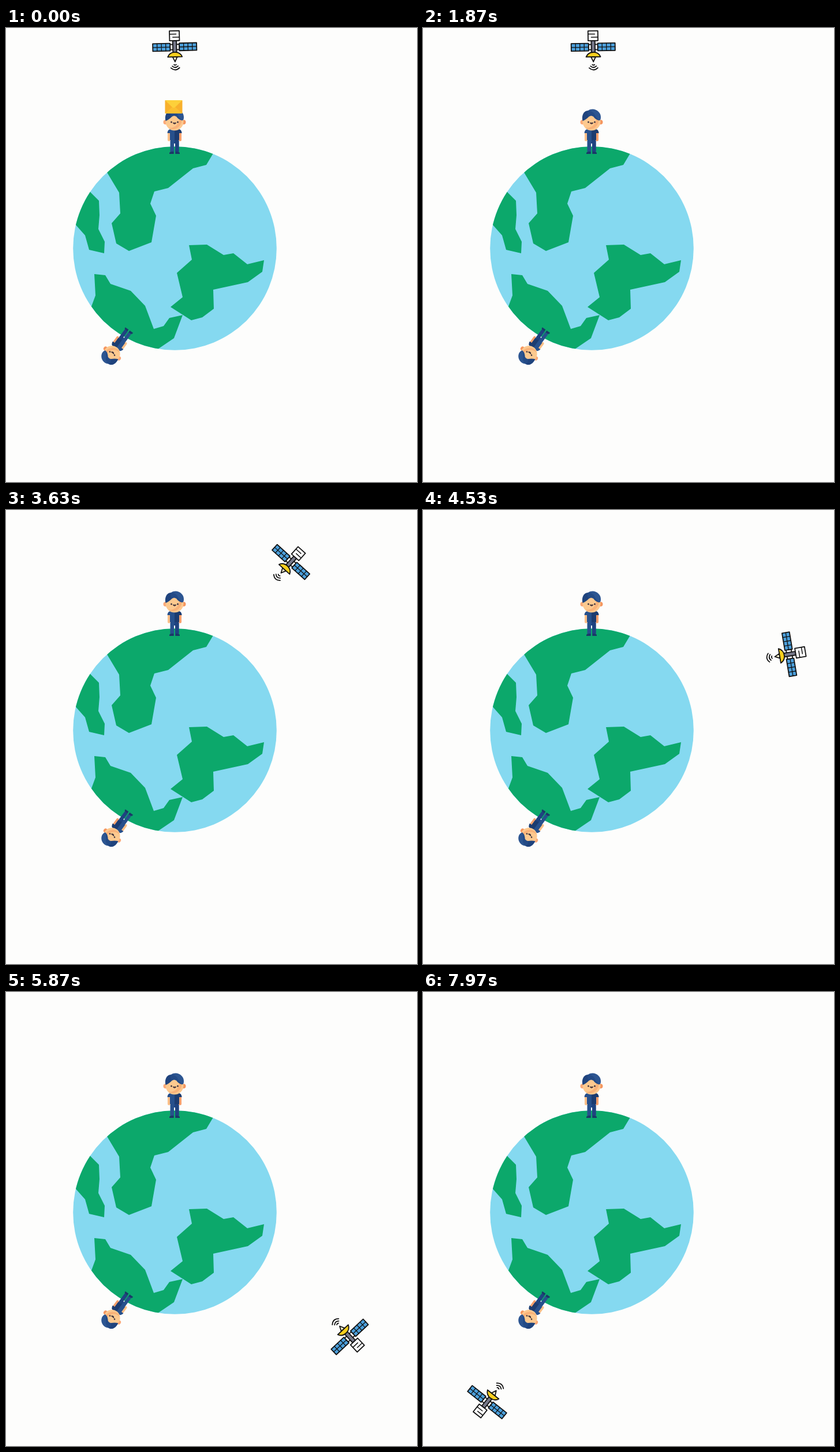
Animation of 712 by 786 pixels, one loop 8 s. Source, as an HTML page:

```html
<!DOCTYPE html>
<html lang="en">
<head>
<meta charset="utf-8">
<title>Satellite message</title>
<style>
  html, body { margin: 0; width: 100%; height: 100%; overflow: hidden; background: #fdfdfc; }
  svg { display: block; width: 100%; height: 100%; }
</style>
</head>
<body>
<svg viewBox="0 0 712 786">
  <defs>
    <clipPath id="globe"><circle cx="292.5" cy="381.5" r="176.3"/></clipPath>

    <!-- origin: middle of the face -->
    <g id="person">
      <path d="M-7.5 28H7.500V51H1V37H-1V51H-7.500Z" fill="#27508c"/>
      <path d="M0 28H7.500V51H1V37H0Z" fill="#1f4380"/>
      <path d="M-9 55V53Q-8 51-5 51H-1.300V55ZM9 55V53Q8 51 5 51H1.300V55Z" fill="#1b3768"/>
      <rect x="-12" y="16" width="5" height="17" rx="2.500" fill="#fbbf88"/>
      <rect x="7" y="16" width="5" height="17" rx="2.500" fill="#f5a06c"/>
      <path d="M-12.500 19Q-12 12-6 12H6Q12 12 12.500 19H8V31H-8V19Z" fill="#27508c"/>
      <path d="M0 12H6Q12 12 12.500 19H8V31H0Z" fill="#1c3c70"/>
      <circle cx="-15.500" r="4" fill="#fba978"/>
      <circle cx="15.500" r="4" fill="#f5965f"/>
      <ellipse cy="-1" rx="15.500" ry="15.500" fill="#fdc98f"/>
      <path d="M9 -13A15.500 15.500 0 0 1 -11 10Q9 11 9 -13Z" fill="#f9b279"/>
      <path d="M-15.500 -2C-18 -12-13 -21-5 -20Q1 -16-4 -10Q-10 -4-15.500 -2Z" fill="#1f437d"/>
      <path d="M-6 -20C4 -27 17 -18 16 -8Q16 -4 14 -3Q7 -4 3 -10Q-1 -12-4 -10Q-9 -15-6 -20Z" fill="#2c5591"/>
      <path d="M-6 -20Q2 -20 6 -12Q9 -6 14 -3Q7 -4 3 -10Q-1 -12-4 -10Q-9 -15-6 -20Z" fill="#234a86"/>
      <g fill="#37313c"><circle cx="-5.500" cy="0" r="1.400"/><circle cx="5.500" cy="0" r="1.400"/></g>
      <path d="M-3 1.200Q0 5 3 1.200Z" fill="#5a2e2e" stroke="#37313c"/>
    </g>

    <g id="panel">
      <rect x="8" y="-6.500" width="30" height="13" fill="#4b9fdb"/>
      <path d="M15.500 -6.500v13M23 -6.500v13M30.500 -6.500v13M8 0h30" stroke-width="1.300"/>
    </g>
  </defs>

  <circle cx="292.5" cy="381.5" r="176.3" fill="#85d9f0"/>
  <g fill="#0ca86b" clip-path="url(#globe)">
    <path d="M175 250L196 285 198 321 183 338 191 373 213 386 252 371 260 325 250 304 257 283 281 277 324 243 347 237 359 217 365 190 160 190Z"/>
    <path d="M146 284L161 299 162 324 160 348 171 370 170 390 144 384 137 359 121 341 100 330 130 265Z"/>
    <path d="M153 426L172 428 181 443 216 455 241 481 256 521 273 516 283 502 306 497 291 537 263 556 250 580 120 520 148 482 155 463Z"/>
    <path d="M317 376L348 375 377 393 394 390 418 409 447 402 444 422 419 440 359 453 360 486 340 501 321 506 285 483 306 466 296 424 322 401Z"/>
  </g>

  <use href="#person" transform="translate(292 163)"/>
  <use href="#person" transform="translate(184 563.5) rotate(216) scale(.91)"/>

  <g id="envelope">
    <rect x="-15" y="-11.500" width="30" height="23" rx="1" fill="#f8b02c"/>
    <path d="M-15 11.500L0 -2 15 11.500Z" fill="#fbbf30"/>
    <path d="M-15 -11.500H15L2 1Q0 2.500-2 1Z" fill="#fdd03a"/>
  </g>

  <g id="satellite" fill="none" stroke="#111" stroke-width="1.800" stroke-linejoin="round" stroke-linecap="round">
    <path d="M-8 -4.500H8V4.500H-8Z" fill="#fff"/>
    <use href="#panel"/>
    <use href="#panel" transform="scale(-1 1)"/>
    <rect x="-3.200" y="-11" width="6.400" height="21" fill="#77798a"/>
    <rect x="-8.500" y="-28" width="17" height="17" fill="#fff"/>
    <path d="M-8 -22.500H3M-3 -17H8" stroke-width="1.500"/>
    <path d="M-4 17H4L0 25.500Z" fill="#fff6d0"/>
    <path d="M-12.500 17Q-9 9 0 9T12.500 17Z" fill="#f9cf1d"/>
    <path d="M-2 30.500Q0 32 2 30.500M-5 33Q0 37.500 5 33M-7.500 36Q0 43 7.500 36"/>
  </g>
</svg>
<script>
const LOOP = 8000;
const ORBIT = { x: 306, y: 391 };
const envelope = document.getElementById("envelope");
const satellite = document.getElementById("satellite");

// Orbit poses: time in s, angle from the top, radius, tilt.
const poses = [
  [1.64, -2.2, 358.3, -1.5],
  [1.87, -1.8, 358.2, -1],
  [3.63, 31.9, 354.6, 42],
  [4.53, 66.7, 357.7, 80.4],
  [5.87, 125.4, 355.3, 136.7],
  [6.77, 169.2, 360.4, 177],
  [7.97, 211.4, 373.9, 218.4],
];

const rate = (i, k) => (poses[i + 1][k] - poses[i][k]) / (poses[i + 1][0] - poses[i][0]);

function slope(i, k) {
  if (i === 0) return 0;
  const last = poses.length - 1;
  if (i === last) return 2 * rate(i - 1, k) - slope(i - 1, k);
  const before = poses[i][0] - poses[i - 1][0];
  const after = poses[i + 1][0] - poses[i][0];
  return (rate(i - 1, k) * after + rate(i, k) * before) / (before + after);
}

// Smooth (Hermite) interpolation of column k.
function poseAt(t, k) {
  if (t <= poses[0][0]) return poses[0][k];
  let i = 0;
  while (i < poses.length - 2 && t > poses[i + 1][0]) i++;
  const h = poses[i + 1][0] - poses[i][0];
  const u = (t - poses[i][0]) / h, v = 1 - u;
  return v * v * (1 + 2 * u) * poses[i][k] + u * u * (3 - 2 * u) * poses[i + 1][k]
    + h * u * v * (v * slope(i, k) - u * slope(i + 1, k));
}

const clamp = x => Math.min(1, Math.max(0, x));
const easeInOut = x => (1 - Math.cos(Math.PI * clamp(x))) / 2;

function draw(t) {
  const angle = poseAt(t, 1) * Math.PI / 180;
  const radius = poseAt(t, 2);
  const x = ORBIT.x + radius * Math.sin(angle);
  const y = ORBIT.y - radius * Math.cos(angle);
  satellite.setAttribute("transform", `translate(${x} ${y}) rotate(${poseAt(t, 3)})`);

  envelope.setAttribute("transform", `translate(290.5 ${136.5 - 104 * easeInOut(t / 0.9)})`);
  envelope.setAttribute("opacity", 1 - clamp((t - 0.9) / 0.25));
}

const start = performance.now();
function tick() {
  draw((performance.now() - start) % LOOP / 1000);
  requestAnimationFrame(tick);
}
tick();
</script>
</body>
</html>
```
